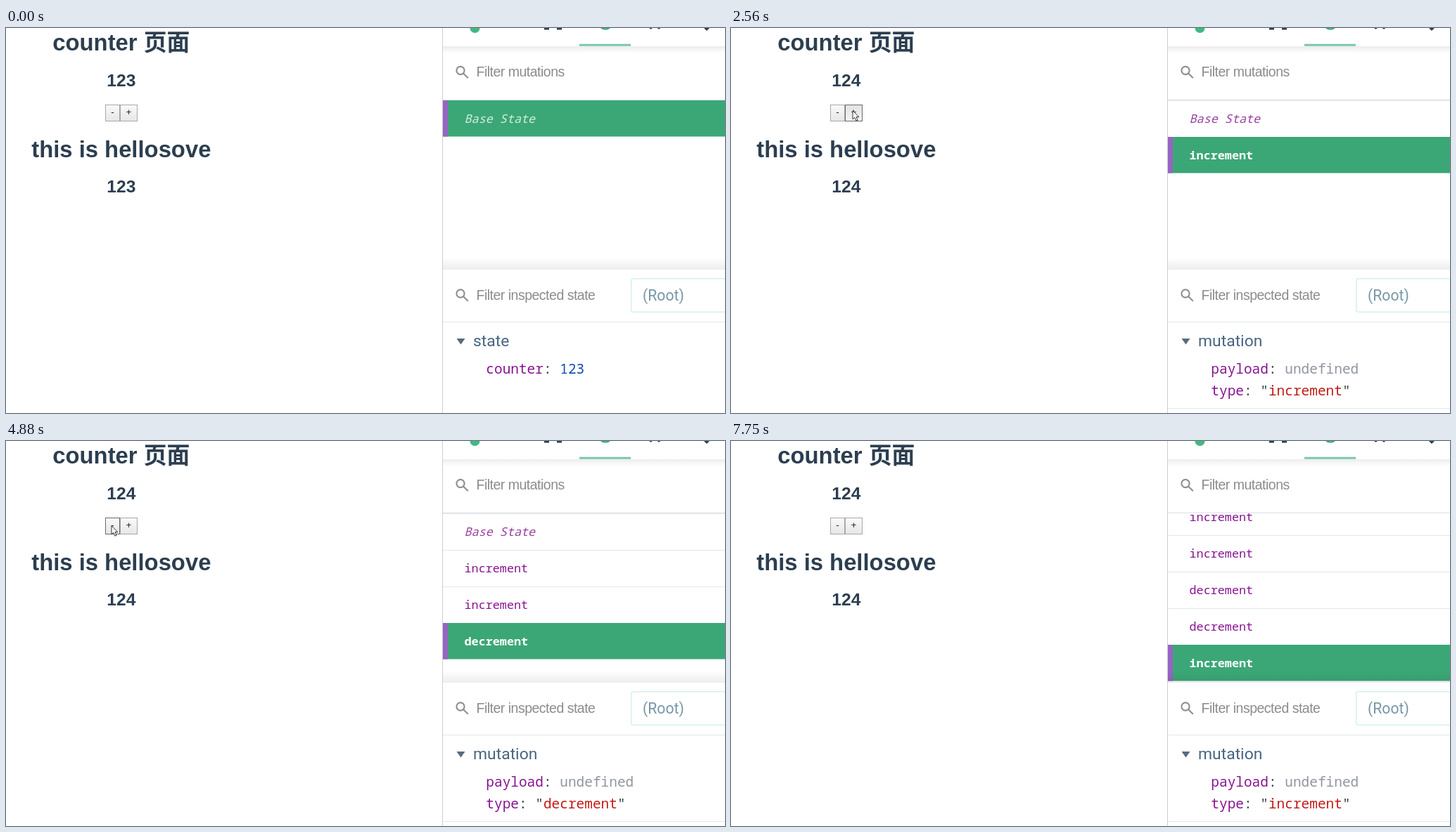
An HTML page with a canvas that plays this animation: 1022x548 px, repeating every 8.14 s.

```html
<!DOCTYPE html>
<html lang="zh-CN">
<head>
<meta charset="utf-8">
<title>Counter</title>
<style>
html, body { margin: 0; width: 100%; height: 100%; overflow: hidden; background: #fff; }
canvas { display: block; }
</style>
</head>
<body>
<canvas id="stage" width="1022" height="548"></canvas>
<script>
const W = 1022, H = 548, LOOP = 8140;
const ctx = document.getElementById('stage').getContext('2d');

const SANS = '"Liberation Sans", Arial, "Noto Sans CJK SC", "Noto Sans CJK", sans-serif';
const ROBOTO = 'Roboto, sans-serif';
const MONO = '"Noto Sans Mono", monospace';
const INK = '#2c3e50', GREEN = '#3ba776', PURPLE = '#881391', LINE = '#e3e6e8';
const PANEL = 621, LIST_TOP = 103, LIST_END = 342, ROW = 52;

const STEP = 75;          // the pointer advances once per step
const PRESS = 150;        // a button is held this long before it counts
const LAG = 310;          // the panel follows the page after this delay
const POINTER_GONE = 7750;

const clicks = [
  { at: 2070, by: 1 }, { at: 2710, by: 1 },
  { at: 4420, by: -1 }, { at: 5110, by: -1 },
  { at: 5960, by: 1 }
];
const start = { x: 906, y: 649 };
const minus = { x: 149.5, y: 120 }, plus = { x: 172.5, y: 117 };
const moves = [
  { at: 300, steps: 4, to: { x: 207, y: 213 } },
  { at: 920, steps: 5, to: { x: 158, y: 94 } },
  { at: 1380, steps: 2, to: plus },
  { at: 3410, steps: 4, to: { x: 136, y: 120 } },
  { at: 3960, steps: 5, to: minus },
  { at: 5420, steps: 2, to: plus },
  { at: 6030, steps: 1, to: { x: 184.5, y: 121 } },
  { at: 6280, steps: 3, to: { x: 292, y: 270 } },
  { at: 6740, steps: 9, to: { x: 926, y: 546 } }
];

const clicksBy = t => clicks.filter(c => c.at <= t);

function pointerAt(t) {
  let { x, y } = start;
  for (const { at, steps, to } of moves) {
    if (t < at) break;
    const done = Math.min(1, (Math.floor((t - at) / STEP) + 1) / steps);
    x += (to.x - x) * done;
    y += (to.y - y) * done;
  }
  return { x, y };
}

function rect(x, y, w, h, color) {
  ctx.fillStyle = color;
  ctx.fillRect(x, y, w, h);
}

function text(str, x, y, font, color, align = 'left') {
  ctx.font = font;
  ctx.fillStyle = color;
  ctx.textAlign = align;
  ctx.fillText(str, x, y);
}

function shape(points, fill) {
  ctx.beginPath();
  points.forEach(([x, y]) => ctx.lineTo(x, y));
  ctx.closePath();
  ctx.fillStyle = fill;
  ctx.fill();
}

function disc(x, y, r, color) {
  ctx.beginPath();
  ctx.arc(x, y, r, 0, 7);
  ctx.fillStyle = color;
  ctx.fill();
}

function gradient(x, y, w, h, from, to) {
  const g = ctx.createLinearGradient(0, y, 0, y + h);
  g.addColorStop(0, from);
  g.addColorStop(1, to);
  rect(x, y, w, h, g);
}

const rule = (y, h = 1, color = LINE) => rect(PANEL, y, W - PANEL, h, color);

function button(x, w, label, pointer, held) {
  const hover = pointer.y > 109 && pointer.y < 133 && pointer.x >= x && pointer.x < x + w - 1;
  const down = hover && held;
  gradient(x, 109, w, 24, down ? '#e2e2e2' : '#fafafa', down ? '#f4f4f4' : '#e6e6e6');
  ctx.strokeStyle = hover ? '#6a6a6a' : '#a9a9a9';
  ctx.lineWidth = 1;
  ctx.strokeRect(x + 0.5, 109.5, w - 1, 23);
  text(label, x + w / 2, 124, `13.5px ${SANS}`, '#222', 'center');
  return hover;
}

// Returns whether the pointer is over a button
function page(t, pointer) {
  const mid = 163.8;
  const count = clicksBy(t).reduce((sum, c) => sum + c.by, 123);
  const big = `bold 32.8px ${SANS}`, small = `bold 24.6px ${SANS}`;
  text('counter 页面', mid, 32, big, INK, 'center');
  text(count, mid, 83, small, INK, 'center');
  text('this is hellosove', mid, 184, big, INK, 'center');
  text(count, mid, 234, small, INK, 'center');

  const held = clicks.some(c => t >= c.at - PRESS && t < c.at);
  const onMinus = button(141, 21, '-', pointer, held);
  const onPlus = button(162, 25, '+', pointer, held);
  return onMinus || onPlus;
}

function searchBox(label, y) {
  ctx.strokeStyle = '#8f8f8f';
  ctx.lineWidth = 2.1;
  ctx.beginPath();
  ctx.arc(646, y - 2.5, 5.6, 0, 7);
  ctx.moveTo(650.2, y + 1.7);
  ctx.lineTo(656.8, y + 8.3);
  ctx.stroke();
  ctx.letterSpacing = '-0.5px';
  text(label, 668.5, y + 6, `19.5px ${SANS}`, '#8c8c8c');
  ctx.letterSpacing = '0px';
}

function toolbar() {
  disc(666.5, 0, 7, '#41b883');
  for (const x of [765, 783]) rect(x, 0, 7, 2.5, INK);
  for (const x of [916.5, 928]) disc(x, -0.5, 2, INK);
  ctx.strokeStyle = GREEN;
  ctx.lineWidth = 2.5;
  ctx.beginPath();
  ctx.arc(852, -8, 9.5, 0, Math.PI);
  ctx.stroke();
  shape([[990, -2], [1002, -2], [996, 4]], INK);
  rect(815, 22.7, 73, 3, '#79c7a8');
  gradient(PANEL, 26, W - PANEL, 10, 'rgba(0,0,0,0.075)', 'rgba(0,0,0,0)');
}

function mutationList(log) {
  const scroll = Math.max(0, log.length * ROW - (LIST_END - LIST_TOP));
  rule(101.6, 1.4);
  ctx.save();
  ctx.beginPath();
  ctx.rect(PANEL, LIST_TOP, W - PANEL, LIST_END - LIST_TOP);
  ctx.clip();
  log.forEach((name, i) => {
    const y = LIST_TOP + i * ROW - scroll;
    const active = i === log.length - 1, base = i === 0;
    if (active) {
      rule(y, ROW - 0.5, GREEN);
      rect(PANEL, y, 7, ROW - 0.5, '#9664c4');
    } else {
      rule(y);
    }
    const color = active ? (base ? '#d5ece1' : '#fff') : (base ? '#983fa1' : PURPLE);
    const style = base ? 'italic ' : active ? '600 ' : '';
    text(name, 651.5, y + 32, `${style}16.8px ${MONO}`, color);
  });
  ctx.restore();
  gradient(PANEL, 327, W - PANEL, 16, 'rgba(0,0,0,0)', 'rgba(0,0,0,0.065)');
  rule(343, 1, '#ececec');
}

// Monospaced line from [string, color] parts
function codeLine(y, ...parts) {
  let x = 682.3;
  for (const [str, color] of parts) {
    text(str, x, y, `19.45px ${MONO}`, color);
    x += ctx.measureText(str).width;
  }
}

function inspector(log) {
  searchBox('Filter inspected state', 380.5);
  ctx.strokeStyle = '#d6f2ec';
  ctx.lineWidth = 1.5;
  ctx.beginPath();
  ctx.roundRect(888.8, 356.8, 160, 47.5, 3);
  ctx.stroke();
  text('(Root)', 905, 388, `21.2px ${ROBOTO}`, '#7896a8');
  rule(418);

  shape([[640.5, 442], [652.5, 442], [646.5, 450.5]], '#586b80');
  const initial = log.length === 1;
  text(initial ? 'state' : 'mutation', 664, 452.5, `22.9px ${ROBOTO}`, '#476582');
  if (initial) {
    codeLine(492, ['counter', PURPLE], [': ', INK], ['123', '#0f4bb0']);
    return;
  }
  codeLine(492, ['payload', PURPLE], [': ', INK], ['undefined', '#9095a0']);
  codeLine(523, ['type', PURPLE], [': "', INK], [log.at(-1), '#c41a16'], ['"', INK]);
  rule(541);
}

function drawPointer({ x, y }, overButton) {
  ctx.save();
  ctx.translate(x, y);
  shape([[0.5, 0.7], [0.5, 13], [3.3, 10.4], [5.4, 15.2], [7.6, 14.3], [5.5, 9.7], [9.3, 9.6]], '#fff');
  ctx.strokeStyle = overButton ? '#333' : '#2f9152';
  ctx.lineWidth = 1;
  ctx.stroke();
  ctx.restore();
}

function draw(t) {
  const pointer = pointerAt(t);
  const log = ['Base State', ...clicksBy(t - LAG).map(c => c.by > 0 ? 'increment' : 'decrement')];
  rect(0, 0, W, H, '#fff');
  const overButton = page(t, pointer);
  rect(PANEL - 1, 0, 1, H, '#cfcfcf');
  toolbar();
  searchBox('Filter mutations', 63);
  mutationList(log);
  inspector(log);
  if (t < POINTER_GONE) drawPointer(pointer, overButton);
}

const begin = performance.now();
function tick() {
  draw((performance.now() - begin) % LOOP);
  requestAnimationFrame(tick);
}
tick();
</script>
</body>
</html>
```
